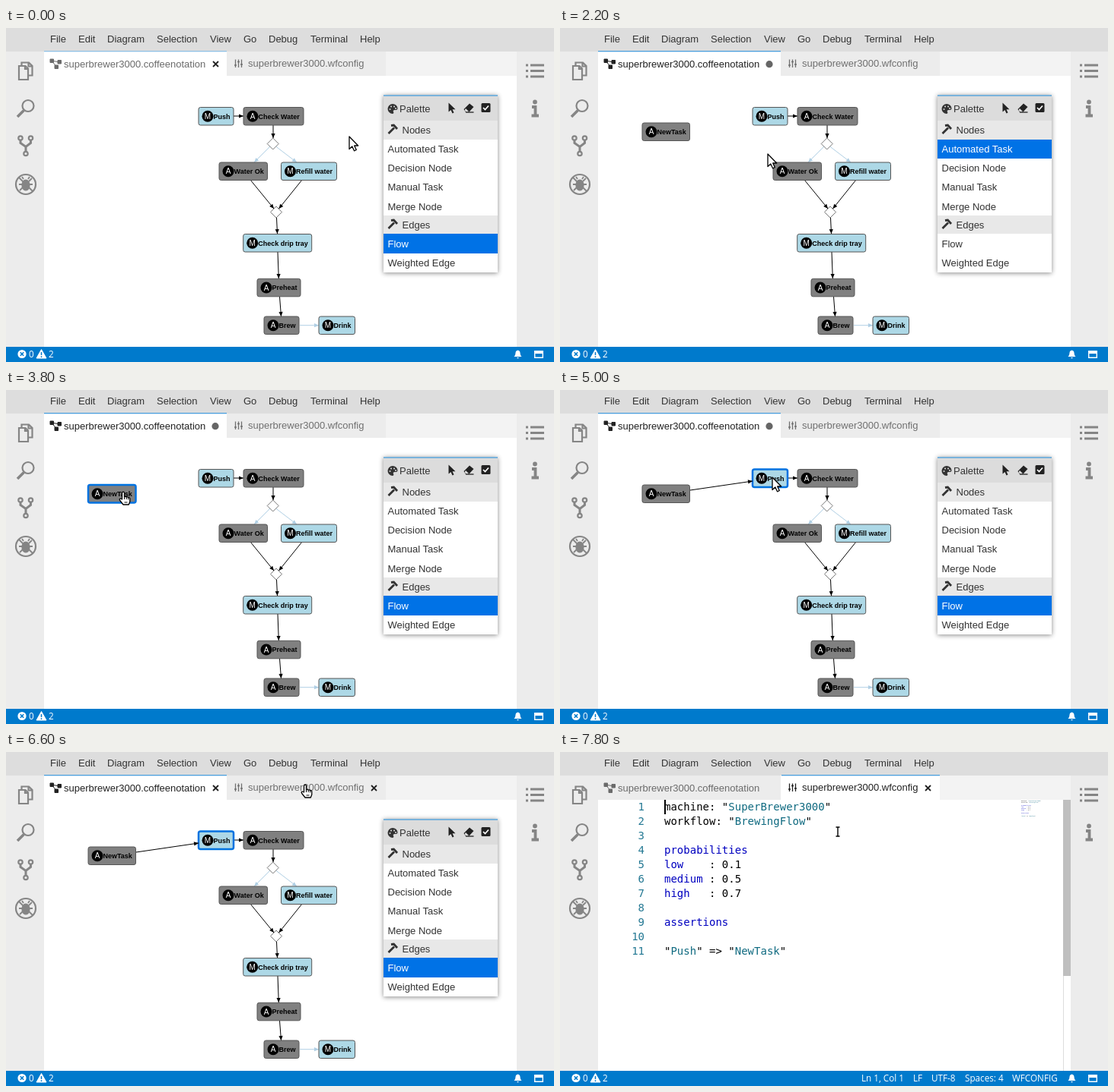
An HTML page that plays this animation: 720 by 440 pixels, repeating every 8000 ms.

```html
<!DOCTYPE html>
<html lang="en">
<head>
<meta charset="utf-8">
<title>Workflow editor</title>
<style>
  html, body { margin: 0; width: 100%; height: 100%; overflow: hidden; background: #fff; }
  svg { display: block; width: 720px; height: 440px; }
  text { font: 13px "Liberation Sans", Arial, sans-serif; fill: #333; white-space: pre; }
  .label { font-size: 9px; font-weight: bold; fill: #000; }
  .badge { font-size: 10px; fill: #fff; text-anchor: middle; }
  .status text { font: 11.7px "Open Sans", sans-serif; fill: #fff; }
  .code { font: 14px "DejaVu Sans Mono", monospace; fill: #000; }
  .num { fill: #237893; text-anchor: end; }
  .key { fill: #0000c0; }
  .str { fill: #0f6a80; }
  .line { fill: none; stroke: #858585; stroke-width: 2.2; }
</style>
</head>
<body>
<svg id="stage" viewBox="0 0 720 440"></svg>
<script>
const rect = (x, y, w, h, fill, more = '') =>
  `<rect x="${x}" y="${y}" width="${w}" height="${h}" fill="${fill}" ${more}/>`;
const text = (x, y, s, more = '') => `<text x="${x}" y="${y}" ${more}>${s}</text>`;
const path = (d, more = '') => `<path d="${d}" ${more}/>`;
const group = (id, body, more = '') => `<g id="${id}" ${more}>${body}</g>`;

function edge(x1, y1, x2, y2, color = '#000') {
  const angle = Math.atan2(y2 - y1, x2 - x1) * 180 / Math.PI;
  return path(`M${x1} ${y1}L${x2} ${y2}`, `stroke="${color}"`) +
    path('M0 0L-6 -2.6V2.6Z', `fill="${color}" transform="translate(${x2} ${y2}) rotate(${angle})"`);
}

function node(x, y, w, kind, label, id = '') {
  const fill = kind === 'M' ? '#add8e6' : '#808080';
  return rect(x, y, w, 23.5, fill, `rx="2.5" stroke="#555" id="${id}"`) +
    `<circle cx="${x + 12}" cy="${y + 11.7}" r="7.5"/>` +
    text(x + 12, y + 15.4, kind, 'class="badge"') +
    text(x + 19.5, y + 15, label, 'class="label"');
}

const diamond = (x, y) => path(`M${x} ${y - 7.5}l7.5 7.5 -7.5 7.5 -7.5 -7.5Z`, 'fill="#fff" stroke="#777"');
const cross = (id, x) => path(`M${x - 3.5} 44l7 7m0 -7l-7 7`, `id="${id}" stroke="#222" stroke-width="1.8"`);

// Window frame
const menu = { File: 58, Edit: 95, Diagram: 133, Selection: 198, View: 268, Go: 312, Debug: 345, Terminal: 400, Help: 465 };
const frame = rect(0, 0, 720, 31, '#dddddd') + rect(0, 31, 50, 389, '#ececec') +
  rect(671, 31, 49, 389, '#ececec') + rect(50, 31, 621, 32, '#f3f3f3') +
  Object.entries(menu).map(([name, x]) => text(x, 19, name)).join('');

const sideIcons = `<g class="line">
  <path d="M20.5 49.500V45.500H30l4.500 4.500V62.500H29M29.500 45.500V50.500H34.500"/>
  <path d="M17 50H25.500l3.500 3.500V68H17ZM25 50V54H29" fill="#ececec"/>
  <circle cx="29" cy="102.500" r="7.500"/><path d="M23.500 108.500L15 117" stroke-width="3.600"/>
  <circle cx="19" cy="145" r="2.700"/><circle cx="32.500" cy="145" r="2.700"/><circle cx="26" cy="165.500" r="2.700"/>
  <path d="M19 148V151.500L26 156.500 32.500 151.500V148M26 156V163" stroke-width="3"/>
  <circle cx="26" cy="206" r="13"/>
  <ellipse cx="26" cy="207" rx="4.500" ry="6.500" fill="#858585"/>
  <path d="M17 197L35 215M17 206H35M18 214L22 210M34 198L30 202M23 199l-2 -3M29 199l2 -3" stroke-width="1.800"/>
  <path d="M683 49H686M683 56.500H686M683 64H686M689 49H707M689 56.500H707M689 64H707" stroke-width="3"/>
  <circle cx="695" cy="97.500" r="1.800" fill="#858585"/>
  <path d="M691 104H695.500V115M690.500 115.500H700" stroke-width="3.800"/></g>`;

const tabs = rect(50, 31, 240, 32, '#fff', 'id="tab1"') + rect(290, 31, 209, 32, '#ececec', 'id="tab2"') +
  rect(50, 30, 240, 1.3, '#8fc0e4', 'id="tabLine"') +
  group('title1', path('M58 41h4.500v4.500H58ZM68 42.500h4.500V47H68ZM64 49h4.500v4.500H64ZM62 43.500L68 44.500M61.500 45L65 49.500',
    'stroke="currentColor" stroke-width="1"') + text(76, 51.5, 'superbrewer3000.coffeenotation', 'style="fill:currentColor"'),
    'fill="currentColor"') +
  group('title2', path('M301.500 41.500V52M305.500 41.500V52M309.500 41.500V52M300 49h3M304 44.500h3M308 48h3',
    'stroke="currentColor" stroke-width="1.300"') + text(318, 51.2, 'superbrewer3000.wfconfig', 'style="fill:currentColor"')) +
  cross('close1', 275.5) + cross('close2', 483.5) +
  '<circle id="dirty" cx="275" cy="47.700" r="4.600" fill="#666"/>';

const status = rect(0, 420, 720, 20, '#007acc') +
  `<circle cx="21" cy="429.500" r="5.600" fill="#fff"/>
   <path d="M18.800 427.300l4.400 4.400m0 -4.400l-4.400 4.400" stroke="#007acc" stroke-width="1.600"/>
   <path d="M46.500 423.500L53 435H40Z" fill="#fff" stroke="#fff" stroke-linejoin="round"/>
   <path d="M46.500 427V431M46.500 432.300V434" stroke="#007acc" stroke-width="1.500"/>
   <path d="M667.500 433Q669.500 431 669.500 428 669.500 425 672.500 424.500 675.500 425 675.500 428 675.500 431 677.500 433ZM671 434h3l-1.500 1.500Z" fill="#fff"/>
   <path d="M694.700 425.700h10.600v8.600h-10.600Z" fill="none" stroke="#fff" stroke-width="1.400"/>
   <path d="M694 425h12v4h-12Z" fill="#fff"/>` +
  text(30, 434, '0') + text(56, 434, '2') +
  group('fileStatus', text(396, 434, 'Ln 1, Col 1') + text(464, 434, 'LF') + text(488, 434, 'UTF-8') +
    text(532, 434, 'Spaces: 4') + text(594, 434, 'WFCONFIG'));

// Workflow diagram
const pale = '#b0cfe4';
const flow = edge(299, 116, 312, 116) + edge(351, 128, 351, 145) +
  edge(347, 156, 326, 177, pale) + edge(354.5, 156, 382, 177, pale) +
  edge(321, 200, 352, 238) + edge(389, 200, 358.5, 238) + edge(355.5, 250, 356.5, 271) +
  edge(357, 295, 358.3, 330) + edge(359.5, 354, 361.5, 380) + edge(386, 391.7, 411, 391.7, pale) +
  diamond(350.7, 152.5) + diamond(355, 242.5) +
  node(253, 104.5, 46, 'M', 'Push', 'push') + node(312, 104.5, 79, 'A', 'Check Water') +
  node(280, 177, 63.5, 'A', 'Water Ok') + node(361.5, 177, 73, 'M', 'Refill water') +
  node(311.7, 271.5, 90, 'M', 'Check drip tray') + node(330, 330.3, 57, 'A', 'Preheat') +
  node(339, 380, 46, 'A', 'Brew') + node(411, 380, 47.5, 'M', 'Drink') +
  group('link', '') + group('newNode', node(108, 125, 62.5, 'A', 'NewTask', 'newTask'));

// Tool palette
const tools = ['Nodes', 'Automated Task', 'Decision Node', 'Manual Task', 'Merge Node', 'Edges', 'Flow', 'Weighted Edge'];
const rowTop = [122, 147, 172, 197, 222, 247, 271, 297, 322];
const rows = tools.map((name, i) => {
  const y = rowTop[i], heading = i % 5 === 0, base = y + (i === 4 ? 18 : i === 6 ? 18 : 17);
  return rect(496, y, 150, rowTop[i + 1] - y, heading ? '#e8e8e8' : '#fff', `id="row${i}"`) +
    (heading ? path(`M502.500 ${y + 17}l7.500 -7.500M506 ${y + 6.500}l3.500 -.5 4.500 5`, 'stroke="#333" stroke-width="2.800" fill="none"') : '') +
    text(heading ? 520.5 : 501.5, base, name, `id="name${i}"`);
}).join('');
const palette = rect(496, 88, 150, 234, '#fff', 'style="filter:drop-shadow(0 1px 3px #0007)"') +
  rect(496, 90, 150, 32, '#dcdcdc') + rect(496, 88, 150, 2, '#7ab3dc') + rows + text(517, 111, 'Palette') +
  `<path d="M508 100a6.300 6.300 0 1 0 0 13q2 -.5 1 -2.500t1.500 -2.500h2q2 0 2 -2a6.500 6 0 0 0 -6.500 -6Z" fill="#333"/>
   <path d="M504.500 107h.1M506 103.500h.1M510 103.500h.1M512 106h.1" stroke="#dcdcdc" stroke-width="1.900" stroke-linecap="round"/>
   <path d="M581.500 98.500V110.500l3 -2.500 2 4.500 2 -1 -2 -4.300h4Z" fill="#222"/>
   <path d="M601.500 107l7.500 -7.500 5.500 4.500 -6.500 7h-4Z" fill="#222"/>
   <path d="M604 106l4 4 -1 .8h-2.500l-2 -2.500Z" fill="#dcdcdc"/><path d="M604 111h10.500" stroke="#222" stroke-width="1.300"/>
   <rect x="624.500" y="99" width="12" height="12" rx="1.500" fill="#222"/>
   <path d="M627 105l2.500 2.500 4.500 -5" fill="none" stroke="#fff" stroke-width="1.700"/>`;

// Text editor
const lines = ['machine: "SuperBrewer3000"', 'workflow: "BrewingFlow"', '', 'probabilities', 'low    : 0.1',
  'medium : 0.5', 'high   : 0.7', '', 'assertions', '', '"Push" =&gt; "NewTask"'];
const paint = s => s.replace(/"(\w+)"|^(probabilities|assertions|low|medium|high)/g, (m, str, key) =>
  str ? `"<tspan class="str">${str}</tspan>"` : `<tspan class="key">${key}</tspan>`);
const editor = rect(50, 63, 621, 357, '#fff') +
  lines.map((s, i) => text(111, 77 + 19 * i, i + 1, 'class="code num"')).join('') +
  group('source', lines.map((s, i) => text(137, 77 + 19 * i, paint(s), 'class="code"')).join('')) +
  '<use href="#source" transform="translate(589.700 56.500) scale(.119 .105)"/>' +
  rect(661, 63, 1, 357, '#ddd') + rect(661, 63, 10, 232, '#bfbfbf') +
  rect(137, 63, 2, 19, '#000', 'id="caret"');

const outline = 'fill="#fff" stroke="#000" stroke-width="1.300" stroke-linejoin="round"';
const pointers = group('arrow', path('M0 0V16.500L3.800 13 6.500 18.800 9.300 17.500 6.700 12H11.700Z', outline)) +
  group('hand', path('M-1.500 9V1Q-1.500 -.8 0 -.8T1.500 1V6Q3 4.700 4.200 6.200 5.700 5.200 6.700 6.800 8.800 6.300 8.800 8.500V12L7.300 16H0L-4.300 10.500Q-5.500 8.500 -3.800 8Z', outline) +
    path('M1.500 6V9M4.200 6.500V9M6.700 7V9.500M1.500 13h4', 'stroke="#000"')) +
  group('beam', path('M-2.500 -6H-.5L0 -5.500 .5 -6H2.500M0 -5.500V5.500M-2.500 6H-.5L0 5.500 .5 6H2.500', 'fill="none" stroke="#000" stroke-width="1.400"'));

document.getElementById('stage').innerHTML = frame + sideIcons + tabs + group('diagram', flow + palette) +
  group('editor', editor) + group('statusBar', status, 'class="status"') + group('pointer', pointers);

const el = id => document.getElementById(id);
const show = (id, on) => { el(id).style.display = on ? '' : 'none'; };
const outlineNode = (id, on) => {
  el(id).setAttribute('stroke', on ? '#0072e0' : '#555');
  el(id).setAttribute('stroke-width', on ? 2.5 : 1);
};

// Pointer stops: step, x, y
const stops = [[0, 451, 143], [1, 451, 143], [4, 527, 155], [5, 527, 155], [7, 103, 119], [8, 103, 119],
  [11, 273, 166], [13, 515, 289], [14, 515, 289], [18, 152, 138], [19, 154, 135], [20, 154, 135],
  [23, 279, 115], [26, 279, 115], [32, 393, 44], [34, 393, 44], [38, 365, 105], [40, 365, 105]];

function pointerAt(step) {
  const i = stops.findIndex(s => s[0] > step);
  const [a, ax, ay] = stops[i - 1], [b, bx, by] = stops[i], k = (step - a) / (b - a);
  return [ax + (bx - ax) * k, ay + (by - ay) * k];
}

function draw(step) {
  const within = (a, b) => step >= a && step < b;
  const editing = step >= 34, [x, y] = pointerAt(step);

  const selected = within(5, 14) ? 1 : 6;
  const hovered = step === 4 ? 1 : step === 13 ? 6 : 0;
  for (const i of [1, 6]) {
    el('row' + i).setAttribute('fill', i === selected ? '#0072e6' : i === hovered ? '#e8e8e8' : '#fff');
    el('name' + i).style.fill = i === selected ? '#fff' : '';
  }

  const focused = within(8, 14) || within(19, 34);
  el('tab1').setAttribute('fill', editing ? '#ececec' : '#fff');
  el('tab2').setAttribute('fill', editing ? '#fff' : '#ececec');
  el('tabLine').setAttribute('x', editing ? 291 : 50);
  el('tabLine').setAttribute('width', editing ? 208 : 240);
  el('tabLine').setAttribute('fill', focused || editing ? '#4a9fdc' : '#8fc0e4');
  el('title1').style.color = focused ? '#222' : '#6b6b6b';
  el('title2').style.color = editing ? '#222' : '#707070';
  show('dirty', within(8, 28));
  show('close1', !within(8, 28) && !editing);
  show('close2', step >= 31);

  show('newNode', step >= 8);
  outlineNode('newTask', within(19, 24));
  outlineNode('push', step >= 24);
  el('link').innerHTML = step >= 24 ? edge(171, 132, 253, 120) : step > 20 ? edge(171, 132, x, y) : '';

  show('diagram', !editing);
  show('editor', step >= 35);
  show('fileStatus', step >= 35);
  show('caret', step >= 39);

  const shape = step >= 36 ? 'beam' : within(18, 20) || within(31, 36) ? 'hand' : 'arrow';
  for (const id of ['arrow', 'hand', 'beam']) show(id, id === shape);
  el('pointer').setAttribute('transform', `translate(${x} ${y})`);
}

const start = performance.now();
let last = -1;
function tick() {
  const step = Math.floor((performance.now() - start) % 8000 / 200);
  if (step !== last) draw(last = step);
  requestAnimationFrame(tick);
}
tick();
</script>
</body>
</html>
```
